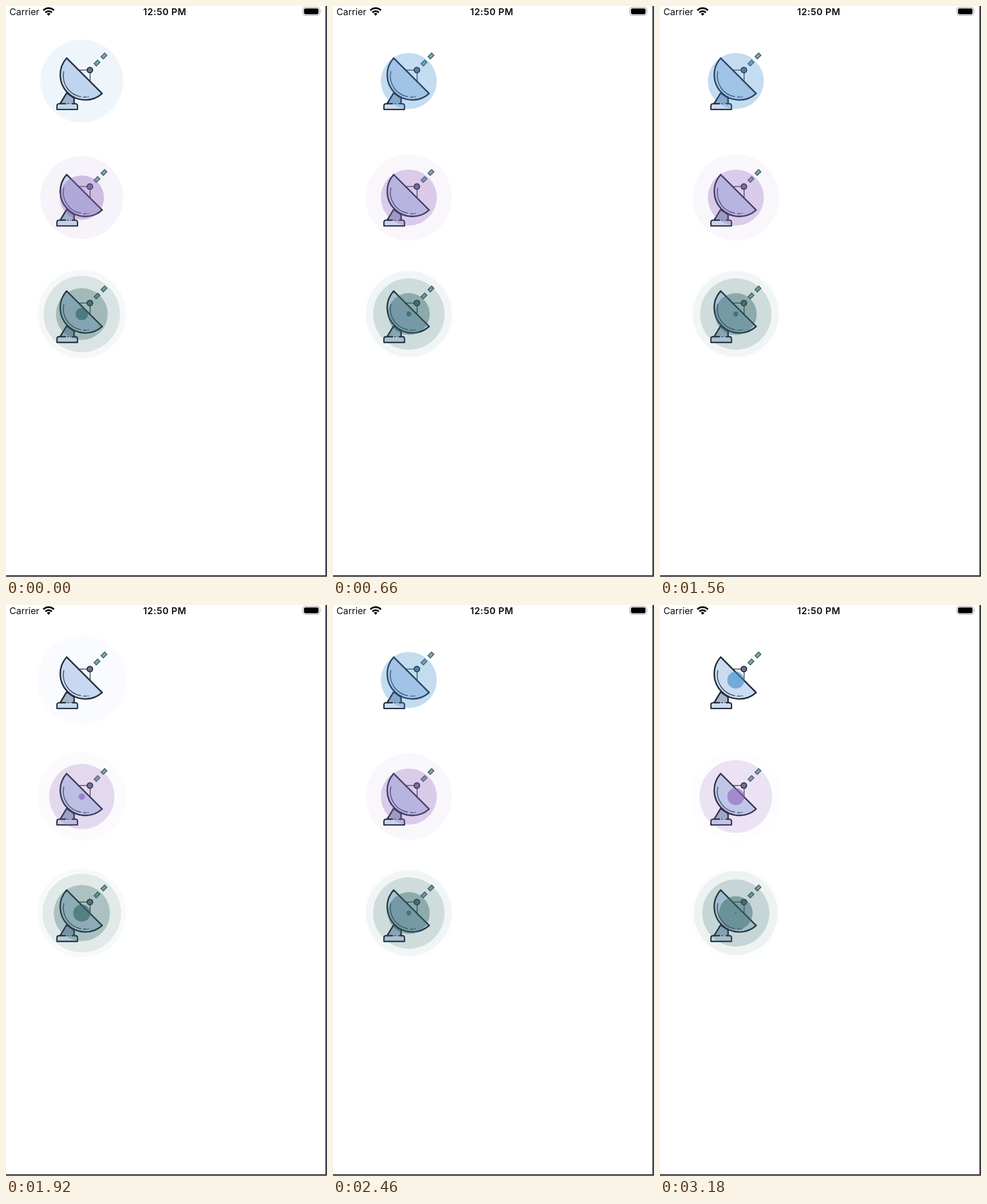
Recreate the animation shown at these times as an HTML page. Size 561 px wide and 998 px high, loop 3240 ms.

```html
<!DOCTYPE html>
<html lang="en">
<head>
<meta charset="utf-8">
<title>Pulsing dishes</title>
<style>
  html, body { margin: 0; width: 100%; height: 100%; overflow: hidden; background: #fff; }
  svg { display: block; width: 561px; height: 998px; }
  text { font: 16px Inter, "Liberation Sans", sans-serif; fill: #0b0b0d; }
  .clock { font-weight: 600; letter-spacing: .5px; text-anchor: middle; }
  .ink { stroke: #222937; stroke-width: 2.6; stroke-linejoin: round; stroke-linecap: round; }
  .thin { fill: none; stroke: #3b4656; stroke-width: 1.5; stroke-linecap: round; }
  .signal { fill: #7fabad; stroke: #47606a; stroke-width: 1.6; }
</style>
</head>
<body>
<svg viewBox="0 0 561 998">
  <defs>
    <g id="dish">
      <path class="ink" fill="#a6b5c9" stroke-width="2.2" d="M106 152 L94.5 171 H119 V161 Z"/>
      <path class="ink" fill="#cbdbf0" style="stroke-width:2.3" d="M104 170.8 H92 Q89 171 89 175 V180.8 H125 V175 Q125 171 122 170.8 H116"/>
      <path d="M105 170.8 H115" stroke="#cbdbf0" stroke-width="2.6"/>
      <path class="thin" d="M107 170.8 h3 M113 170.8 h.6"/>
      <path class="thin" d="M127 112 H142 M147 117 V132"/>
      <path class="ink" fill="#cbdbf0" d="M106 91 A43.9 43.9 0 0 0 168 153 Z"/>
      <path class="thin" d="M101 114.5 A37 37 0 0 0 130.5 158.5 M135.5 159.3 h5 M143 158.8 h1"/>
      <circle class="ink" cx="146.6" cy="112" r="4.8" fill="#6c768f" style="stroke-width:2"/>
      <rect class="signal" x="-4.5" y="-2.8" width="9" height="5.6" transform="translate(159 99.6) rotate(-45)"/>
      <rect class="signal" x="-4.5" y="-2.8" width="9" height="5.6" transform="translate(171.2 87.4) rotate(-45)"/>
    </g>
  </defs>

  <text x="6" y="16">Carrier</text>
  <text class="clock" x="277.5" y="16">12:50 PM</text>
  <g fill="none" stroke="#000" stroke-width="3.1">
    <path d="M65.3 7.6 A13 13 0 0 1 83.7 7.6"/>
    <path d="M68.9 11.3 A8 8 0 0 1 80.1 11.3"/>
    <path d="M74.5 17 L71.4 13.8 A4.5 4.5 0 0 1 77.6 13.8 Z" fill="#000" stroke="none"/>
  </g>
  <rect x="518.8" y="2.3" width="29.4" height="14" rx="4" fill="none" stroke="#9a9a9e"/>
  <rect x="520.8" y="4.2" width="25.4" height="10.2" rx="2.4"/>
  <path d="M549.8 7 Q551.6 9.2 549.8 11.6 Z" fill="#9a9a9e"/>

  <g id="stations"></g>

  <path d="M559.6 0 V996.2 H0" fill="none" stroke="#343036" stroke-width="2.6"/>
</svg>
<script>
const NS = "http://www.w3.org/2000/svg";
const LOOP = 3240, TICK = 60, START = 346;
const CX = 132.5, CY = 131.2, GAP = 203.6, RADIUS = 81, ALPHA = 0.75;

const stations = [
  { color: "rgb(58,139,204)", count: 1, duration: 900 },
  { color: "rgb(142,102,188)", count: 3, duration: 900 },
  { color: "rgb(48,100,102)", count: 5, duration: 4500 }
];

function add(parent, name, attrs) {
  const el = document.createElementNS(NS, name);
  for (const key in attrs) el.setAttribute(key, attrs[key]);
  return parent.appendChild(el);
}

// cubic-bezier(.25, .1, .25, 1)
function ease(x) {
  let lo = 0, hi = 1, s = 0.5;
  for (let i = 0; i < 24; i++) {
    s = (lo + hi) / 2;
    if (0.75 * s * (1 - s) + s ** 3 < x) lo = s; else hi = s;
  }
  return 0.3 * s * (1 - s) ** 2 + 3 * s * s * (1 - s) + s ** 3;
}

const root = document.getElementById("stations");
stations.forEach((st, row) => {
  const g = add(root, "g", { transform: `translate(0 ${row * GAP})` });
  add(g, "use", { href: "#dish" });
  st.rings = Array.from({ length: st.count }, () =>
    add(g, "circle", { cx: CX, cy: CY, r: 0, fill: st.color }));
});

function draw(now) {
  const t = Math.floor((now % LOOP) / TICK) * TICK;
  for (const { rings, count, duration } of stations) {
    rings.forEach((ring, i) => {
      const p = ((t - START) / duration + i / count + 1) % 1;
      const e = ease(p);
      ring.setAttribute("r", RADIUS * e);
      ring.setAttribute("fill-opacity", ALPHA * (1 - e));
    });
  }
}

const begin = performance.now();
function frame() {
  draw(performance.now() - begin);
  requestAnimationFrame(frame);
}
frame();
</script>
</body>
</html>
```
